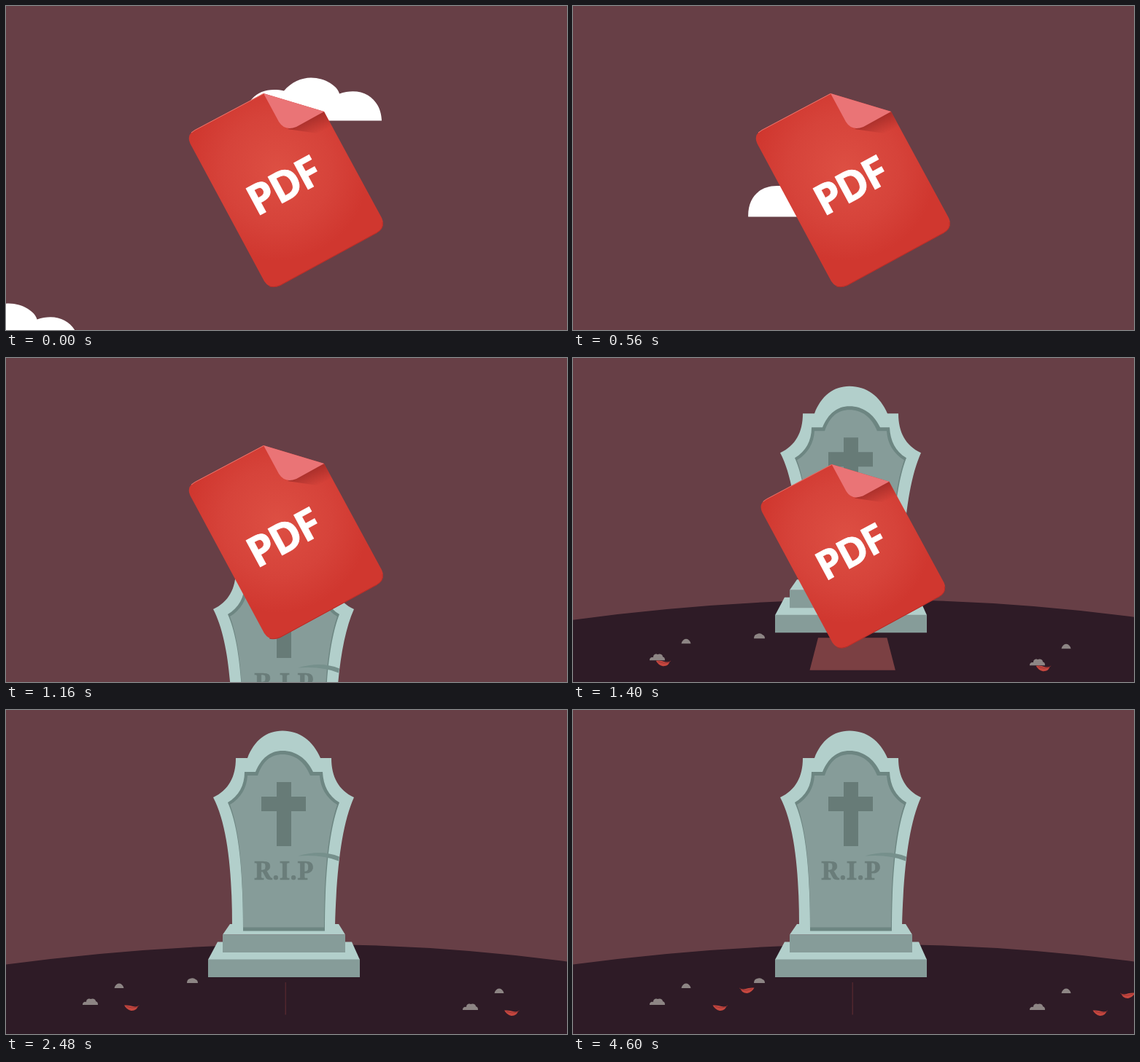
Write an HTML page that moves like this. It is 769 by 445 pixels and loops after 4.64 s.

```html
<!DOCTYPE html>
<html lang="en">
<head>
<meta charset="utf-8">
<title>PDF, rest in peace</title>
<style>
html, body { margin: 0; width: 100%; height: 100%; overflow: hidden; background: #673f46; }
svg { display: block; width: 769px; height: 445px; }
</style>
</head>
<body>
<svg viewBox="0 0 769 445" xmlns="http://www.w3.org/2000/svg">
  <defs>
    <path id="cloud" fill="#fff" d="M0 0C-1 -28 18 -48 53 -41C63 -53 77 -59 90 -59C110 -59 127 -47 129 -37C160 -48 186 -31 187 0Z"/>
    <g id="leaf">
      <path fill="#c5473f" d="M0 .6Q7 0 12 2Q16 3 19 1.500Q17 8.500 9.500 8Q3 6.500 0 .6Z"/>
      <path fill="none" stroke="#8c2f30" stroke-width=".7" d="M3 2Q11 5.500 17.500 3L20.500 .8"/>
    </g>
    <g id="stones" fill="#8d8584">
      <path d="M105 405C105 401 108 400.500 110 401C110 396 115 396 116 397C119 395.500 123 397 123 400C126 401 126 403 126 405Z"/>
      <path d="M148.500 382Q150 376 155 375.500Q160 376 161.500 382Z"/>
    </g>
    <radialGradient id="body" gradientUnits="userSpaceOnUse" cx="372" cy="225" r="125">
      <stop offset="0" stop-color="#dd4f43"/>
      <stop offset=".6" stop-color="#d6433a"/>
      <stop offset="1" stop-color="#d0372f"/>
    </radialGradient>
    <linearGradient id="fold" gradientUnits="userSpaceOnUse" x1="414" y1="157" x2="424" y2="177">
      <stop offset="0" stop-color="#7a1c1c" stop-opacity=".45"/>
      <stop offset="1" stop-color="#7a1c1c" stop-opacity="0"/>
    </linearGradient>
    <clipPath id="above"><rect width="769" height="418.500"/></clipPath>
    <filter id="haze" filterUnits="userSpaceOnUse" x="200" y="60" width="370" height="420" color-interpolation-filters="sRGB">
      <feGaussianBlur in="SourceGraphic" stdDeviation="14" result="soft"/>
      <feTurbulence type="fractalNoise" baseFrequency=".018 .012" numOctaves="5" seed="7"/>
      <feColorMatrix values="0 0 0 0 0  0 0 0 0 0  0 0 0 0 0  1.2 0 0 0 -.2" result="noise"/>
      <feComposite in="soft" in2="noise" operator="in"/>
    </filter>
  </defs>

  <rect width="769" height="445" fill="#673f46"/>
  <g id="clouds"></g>

  <g id="yard">
    <path fill="#2e1b26" d="M0 349.500Q400 296 769 345.500V680H0Z"/>
    <use href="#stones"/>
    <use href="#stones" x="521" y="7"/>
    <path fill="#8d8584" d="M248 375Q248 370 252 369Q257 367 260 370Q263 371 263 375Z"/>

    <path fill="#b2cfcb" d="M307 294H456L465 308.500H297Z"/>
    <path fill="#b2cfcb" d="M290 318.500H474L485 343H277Z"/>
    <path fill="#869c99" d="M297 308.500H465V333H297ZM277 342.500H485V367H277Z"/>

    <path fill="#b2cfcb" d="M331 66C340 42 357 28.500 379 28.500C402 28.500 421 42 431 66H446C446 92 456 110 477 120C460 158 453 220 451 296H310C310 225 304 158 284 120C305 110 315 92 315 66Z"/>
    <path fill="#6d8682" d="M342 85C350 66 362 56 379 56C397 56 412 66 421 85H434C435 104 442 118 457 127C444 160 437 220 437 303.500H325C325 220 319 160 304 127C319 118 327 104 327 85Z"/>
    <path fill="#869c99" d="M345 90C352 70 363 61 379 61C395 61 409 70 417 90H430C431 107 439 121 454 130C442 165 436 220 436 298.500H325C325 220 320 165 307 130C322 121 330 107 331 90Z"/>
    <path fill="#677b77" d="M371 99H391V119H411V139H391V187H371V139H350V119H371Z"/>
    <text x="340" y="233" font-family="'Noto Serif', serif" font-weight="700" font-size="35" fill="#6a7d7a" stroke="#6a7d7a" stroke-width=".7">R.I.P</text>
    <path fill="#76908c" d="M400 200.500Q432 191 457 201.500L456 207.500Q434 198 400 200.500Z"/>

    <path id="hole"/>
    <g id="leaves"></g>
  </g>

  <g clip-path="url(#above)">
    <g id="file">
      <path fill="url(#body)" d="M353 120L436 145L515 291Q521 304 508 312L376 384Q362 390 354 378L252.500 189Q247 177 259 170Z"/>
      <path fill="url(#fold)" d="M386 169L436 145L454 179Z"/>
      <path fill="#ea7476" d="M353 120L436 145L398 166Q382 172 374 159Z"/>
      <path fill="none" stroke="#e4776f" stroke-width="1" d="M254 174L259 170.500L353 120.500"/>
      <path fill="none" stroke="#b52d28" stroke-width="1" d="M516 297Q518 306 508 311.500L376 383.500Q367 387 361 385"/>
      <text transform="translate(344 289.600) rotate(-28.200)" font-family="'Open Sans', sans-serif" font-weight="700" font-size="58" letter-spacing="-2.500" fill="#fff" stroke="#fff" stroke-width=".8">PDF</text>
    </g>
    <g id="smoke">
      <g filter="url(#haze)" fill="#a04745">
        <ellipse cx="462" cy="205" rx="42" ry="66"/>
        <ellipse cx="458" cy="365" rx="48" ry="76"/>
        <ellipse cx="292" cy="350" rx="24" ry="80"/>
        <ellipse cx="385" cy="335" rx="90" ry="88"/>
        <ellipse cx="385" cy="440" rx="132" ry="48"/>
      </g>
    </g>
  </g>
</svg>
<script>
const LOOP = 4640, STEP = 40, RISE = 1.125;
const $ = id => document.getElementById(id);
const clamp = v => Math.max(0, Math.min(1, v));
const span = (t, a, b) => clamp((t - a) / (b - a));
const smooth = p => p * p * (3 - 2 * p);

function addUse(parent, ref) {
  const el = document.createElementNS("http://www.w3.org/2000/svg", "use");
  el.setAttribute("href", ref);
  return $(parent).appendChild(el);
}
const put = (el, x, y, extra = "") => el.setAttribute("transform", `translate(${x} ${y}) ${extra}`);
const show = (el, on) => el.setAttribute("display", on ? "inline" : "none");

// Each cloud: place at a known time, and its sideways speed
const clouds = [
  { at: 0, x: 328, y: 157.5, vx: .21 },
  { at: 0, x: -86.5, y: 467.5, vx: .35 },
  { at: 800, x: 305, y: 19.5, vx: .27 },
  { at: 800, x: 394.5, y: 342, vx: .245 }
].map(c => ({ ...c, el: addUse("clouds", "#cloud") }));

const leaves = [0, 1, 2, 3].map(() => addUse("leaves", "#leaf"));
const drift = t => Math.sin(.00047 * Math.max(0, 3700 - t)) ** 2;

// Distance of the graveyard below its resting place
function depth(t) {
  if (t < 1260) return 225 - RISE * (t - 1160);
  return 112.5 * (1 - span(t, 1260, 1460)) ** 2;
}

function drawLeaves(t) {
  const right = 191.5 - 100 * drift(t);
  const left = 198.5 + 110 * drift(t - 2080);
  put(leaves[0], right, 405);
  put(leaves[1], right + 521, 412);
  put(leaves[2], left + 19.5, 381, "scale(-1 1)");
  put(leaves[3], left + 541.5, 388, "scale(-1 1)");
  show(leaves[2], t >= 2860);
  show(leaves[3], t >= 2860);
}

function drawHole(t) {
  const w = Math.max(.007, 1 - smooth(span(t, 1720, 2080)));
  const [top, bottom] = [47 * w, 58.5 * w];
  const hole = $("hole");
  hole.setAttribute("d", `M${383 - top} 374H${383 + top + .4}L${383 + bottom + .4} 418.5H${383 - bottom}Z`);
  hole.setAttribute("fill", w < .01 ? "#5c2b31" : "#7b4043");
}

function draw(t) {
  for (const c of clouds) put(c.el, c.x + c.vx * (t - c.at), c.y - RISE * (t - c.at));
  put($("yard"), 0, depth(t));
  drawHole(t);
  drawLeaves(t);

  const fall = span(t, 1320, 1600) ** 2;
  const size = 1 - .62 * fall;
  put($("file"), 384, 253 + 235 * fall, `scale(${size}) translate(-384 -253)`);
  show($("file"), fall < 1);

  const puff = smooth(span(t, 1460, 1660)) * (1 - smooth(span(t, 1680, 2200)));
  show($("smoke"), puff > 0);
  $("smoke").setAttribute("opacity", puff);
  put($("smoke"), 0, -.05 * (t - 1720));
}

const start = performance.now();
function tick() {
  const t = (performance.now() - start) % LOOP;
  draw(Math.floor(t / STEP) * STEP);
  requestAnimationFrame(tick);
}
draw(0);
requestAnimationFrame(tick);
</script>
</body>
</html>
```
